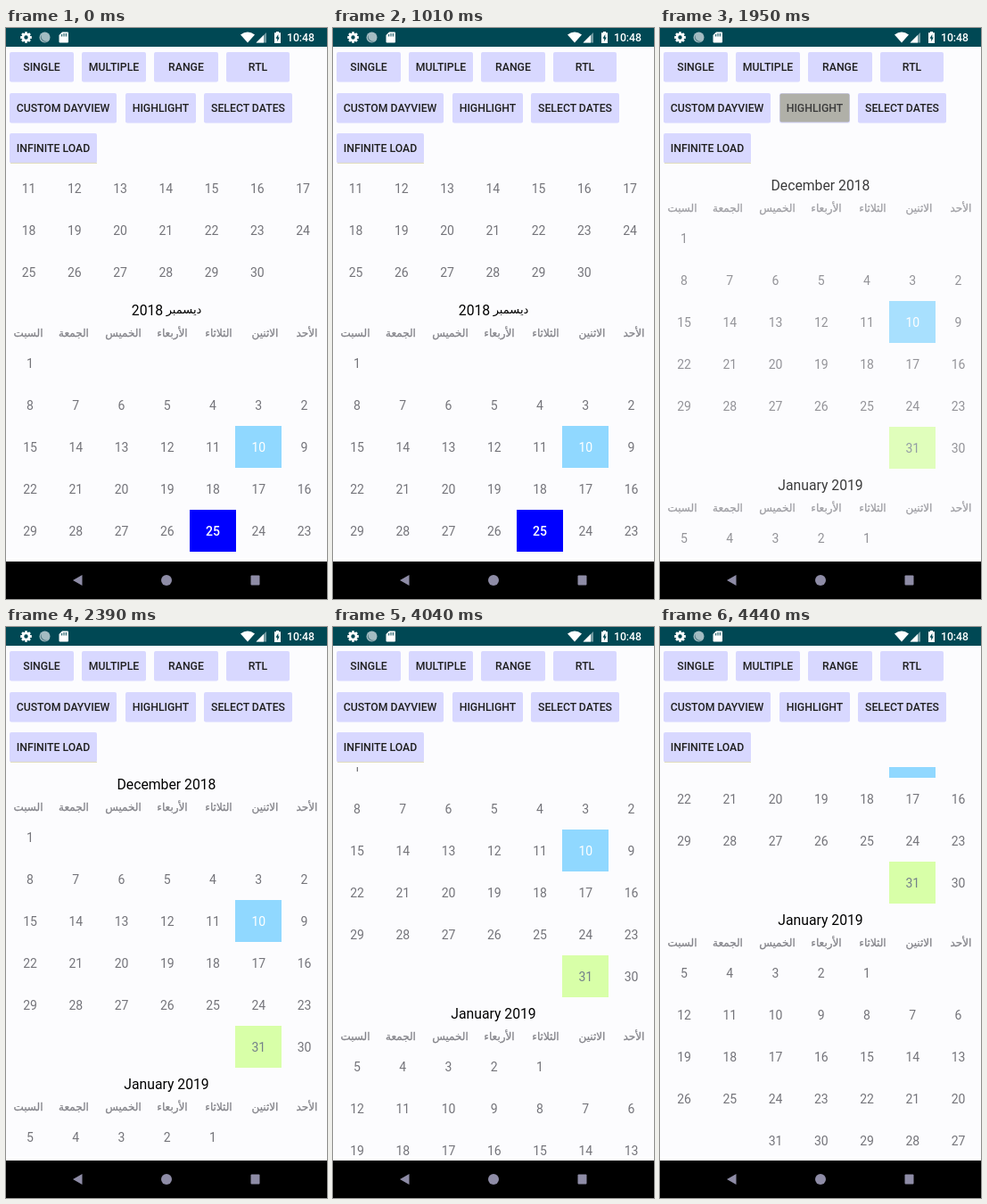
Write an HTML page that moves like this. It is 360 px wide and 640 px high and loops after 8000 ms.

```html
<!DOCTYPE html>
<html lang="en">
<head>
<meta charset="utf-8">
<title>Calendar</title>
<style>
html, body { margin: 0; width: 100%; height: 100%; overflow: hidden; background: #fcfcfe; }
svg { display: block; width: 100%; height: 100%; }
text { font-family: Roboto, "DejaVu Sans", sans-serif; text-anchor: middle; }
.button { font-size: 12.25px; font-weight: 500; fill: #202020; }
.title { font-size: 15.75px; fill: #000; }
.arabic { font-size: 13px; }
.weekday { font-size: 12px; fill: #84848a; stroke: #84848a; stroke-width: .3px; }
.day { font-size: 14px; fill: #74747a; }
.today { fill: #fff; }
.picked { fill: #fff; font-weight: 500; }
.marked { fill: #74808a; }
.clock { font-size: 12.25px; font-weight: 500; fill: #fff; }
</style>
</head>
<body>
<svg id="stage" viewBox="0 0 360 640">
  <defs>
    <clipPath id="listClip"><rect y="157" width="360" height="441"/></clipPath>
    <clipPath id="rippleClip"><rect x="134.5" y="73.5" width="78" height="32" rx="2"/></clipPath>
  </defs>
  <rect width="360" height="640" fill="#fcfcfe"/>
  <rect y="594" width="360" height="4" fill="#fff"/>
  <g clip-path="url(#listClip)">
    <g id="rtlView"></g>
    <g id="highlightView"></g>
  </g>
  <g id="buttons"></g>
  <g clip-path="url(#rippleClip)"><circle id="ripple" cx="173.5" cy="89.5" fill="#b0b0a8"/></g>
  <g id="labels"></g>

  <rect width="360" height="21" fill="#004854"/>
  <g fill="#fff">
    <g id="gear" transform="translate(22.5 10.5)"></g>
    <circle cx="43.5" cy="10.5" r="6" fill="#a4bcc2"/>
    <path d="M40 7.5a5 5 0 0 0 7 7a5.5 5.5 0 0 1-7-7z" fill="#577f89"/>
    <path d="M63 4.5h6q1 0 1 1v10q0 1-1 1h-8.500q-1 0-1-1v-7.500z"/>
    <path d="M62.700 7v2.500M65 6v3.500M67.300 6v3.500" stroke="#004854" stroke-width="1"/>
    <path d="M263 7.500Q271 1.500 279 7.500L271 16.500z"/>
    <path d="M280.500 16.500h11.500V5z" opacity=".45"/>
    <path d="M280.500 16.500h8.500V8z"/>
    <path d="M303 4h3v1.300h2v11.700h-7V5.300h2z"/>
    <path d="M305.300 7l-2.800 4.800h1.700v3.500l2.600-4.800h-1.500z" fill="#004854"/>
  </g>
  <text class="clock" x="330.500" y="15">10:48</text>

  <rect y="598" width="360" height="42"/>
  <g fill="#8e8ca6">
    <path d="M75 619l10.500-6v12z"/>
    <circle cx="180" cy="619" r="6"/>
    <rect x="274.5" y="613.5" width="10" height="11" rx="1"/>
  </g>
</svg>
<script>
const LOOP = 8000, PITCH = 51.25, ROW = 47;
const WEEKDAYS = ["السبت", "الجمعة", "الخميس", "الأربعاء", "الثلاثاء", "الاثنين", "الأحد"];
const FILLS = { today: "#90d8ff", picked: "#0000ff", marked: "#d8ffa8" };
const $ = id => document.getElementById(id);

function add(parent, tag, attrs, text) {
  const el = document.createElementNS("http://www.w3.org/2000/svg", tag);
  for (const key in attrs) el.setAttribute(key, attrs[key]);
  if (text !== undefined) el.textContent = text;
  parent.appendChild(el);
  return el;
}

function label(parent, cls, x, y, text) {
  return add(parent, "text", { class: cls, x, y }, text);
}

// Days of one month; y is the centre of its title
function days(parent, y, first, count, rtl, styles = {}) {
  for (let d = 1; d <= count; d++) {
    const slot = first + d - 1;
    const col = rtl ? 6 - slot % 7 : slot % 7;
    const cx = (rtl ? 27 : 25.5) + PITCH * col;
    const cy = y + 60 + ROW * Math.floor(slot / 7);
    const style = styles[d] || "";
    if (style) {
      add(parent, "rect", {
        x: Math.floor(cx - 25.5), y: cy - 24, width: 52, height: ROW, fill: FILLS[style]
      });
    }
    label(parent, "day " + style, cx, cy + 5, d);
  }
}

function weekdays(parent, y) {
  const centres = [25, 76, 131.5, 186.5, 238.5, 290.5, 337.5];
  WEEKDAYS.forEach((name, i) => label(parent, "weekday", centres[i], y + 30, name));
}

function button(text, x, y, width) {
  add($("buttons"), "rect", { x, y, width, height: 33.5, rx: 2, fill: "#d8d8ff" });
  return label($("labels"), "button", x + width / 2, y + 21.4, text);
}

const rtlView = $("rtlView"), highlightView = $("highlightView"), ripple = $("ripple");

days(rtlView, 26, 4, 30, false);
label(rtlView, "title", 158.5, 322, "2018");
label(rtlView, "title arabic", 199.5, 320, "ديسمبر");
weekdays(rtlView, 316);
days(rtlView, 316, 6, 31, true, { 10: "today", 25: "picked" });

label(highlightView, "title", 180, 182, "December 2018");
weekdays(highlightView, 176);
days(highlightView, 176, 6, 31, true, { 10: "today", 31: "marked" });
label(highlightView, "title", 180, 518, "January 2019");
weekdays(highlightView, 512);
days(highlightView, 512, 2, 31, true);

button("SINGLE", 4, 27, 72);
button("MULTIPLE", 85, 27, 72);
button("RANGE", 166, 27, 72);
button("RTL", 247, 27, 71);
button("CUSTOM DAYVIEW", 4, 73, 120);
const highlight = button("HIGHLIGHT", 134, 73, 79);
button("SELECT DATES", 222, 73, 99);
button("INFINITE LOAD", 4, 118, 98);
add($("buttons"), "rect", { x: 5, y: 151, width: 97, height: 1, fill: "#dedabc" });

for (let i = 0; i < 8; i++) {
  add($("gear"), "rect", { x: -1.4, y: -6.3, width: 2.8, height: 3, rx: .5, transform: `rotate(${i * 45})` });
}
add($("gear"), "circle", { r: 3.5, fill: "none", stroke: "#fff", "stroke-width": 2.6 });

const clamp = v => Math.max(0, Math.min(1, v));

// A short drag and fling, advancing in screen refresh steps
function scrollAt(t) {
  if (t < 3900) return 0;
  const u = Math.min(12, Math.floor((t - 3900) / 44.2)) / 12;
  return 9 + 175 * (1 - Math.pow(1 - Math.pow(u, 1.3), 2.837));
}

function draw(t) {
  const appear = clamp((t - 1790) / 210);
  rtlView.style.display = appear ? "none" : "";
  highlightView.style.display = appear ? "" : "none";
  highlightView.setAttribute("opacity", appear);
  highlightView.setAttribute("transform", `translate(0 ${-Math.round(scrollAt(t))})`);

  const grow = clamp((t - 1680) / 260), fade = clamp((t - 1990) / 400);
  const strength = t < 1680 ? 0 : Math.min(1, .5 + grow / 2) * (1 - fade);
  ripple.setAttribute("r", 8 + 37 * grow);
  ripple.setAttribute("opacity", strength);
  const shade = Math.round(32 + 28 * strength);
  highlight.style.fill = `rgb(${shade},${shade},${shade})`;
}

const start = performance.now();
function tick() {
  draw((performance.now() - start) % LOOP);
  requestAnimationFrame(tick);
}
tick();
</script>
</body>
</html>
```
